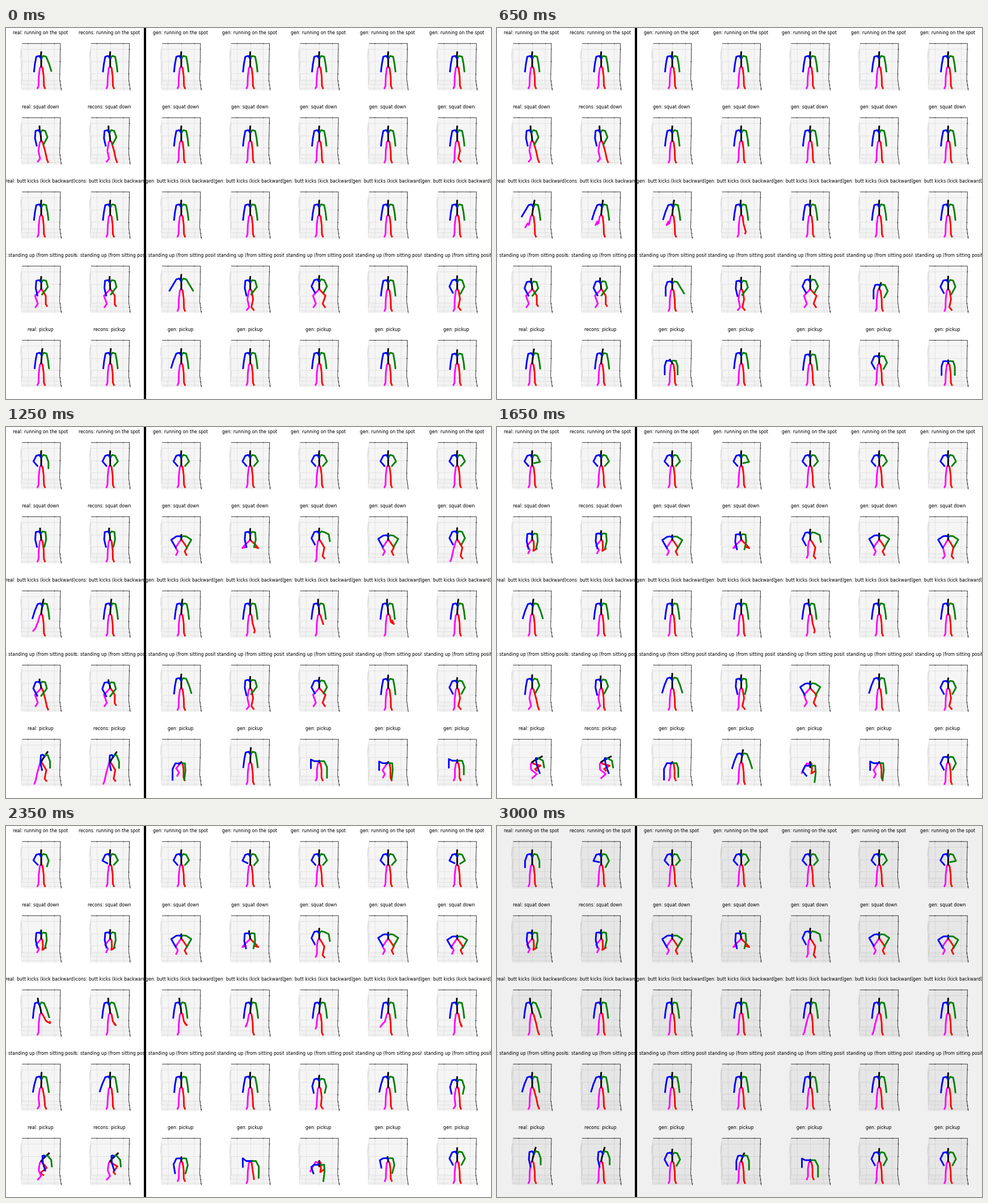
Write a matplotlib script that moves like this. It is 855 by 655 pixels and loops after 3.25 s.

```python
import numpy as np
import matplotlib.pyplot as plt
from matplotlib.animation import FuncAnimation
from matplotlib.collections import LineCollection, PolyCollection
from matplotlib.patches import Rectangle

W, H, DPI = 855, 655, 100
PX = 72 / DPI
CELL_W, CELL_H = 121.6, 131
BAR_X, BAR_W = 243.3, 3.7
FRAMES, LAST = 65, 60
KEYS = np.array([0, 13, 25, 33, 42, 53, LAST])

# Elbow and wrist from the shoulder, x pointing outward
ARMS = dict(
    hang=[(2.5, 13), (4, 26)], swing=[(5, 12), (9, 25)], out=[(6, 10), (12, 20)],
    bent=[(5, 10), (-2, 18)], fold=[(5, 11), (-5, 13)], loose=[(5, 11), (-1, 22)],
    soft=[(4, 11), (4, 22)], front=[(1, 13), (-2, 26)], inward=[(4, 11), (-3, 24)],
    cover=[(3, 11), (-7, 24)], across=[(-2, 12), (-7, 26)], akimbo=[(9, 6), (1, 20)],
    up=[(8, 4), (10, 16)], drop=[(3, 9), (3, 24)], drag=[(5, 10), (5, 29)],
    dip=[(1, 12), (-1, 29)], level=[(6, -3), (6, 12)],
)
# Knee, ankle and toe from the root, x pointing outward
LEGS = dict(
    stand=[(4.3, 18), (4.8, 34.5), (6.5, 38.5)], bend=[(5, 18), (2, 32), (6, 37)],
    wide=[(7, 19), (10, 33), (12, 38)], half=[(9, 14), (6, 29), (9, 33)],
    short=[(4, 13), (4, 27), (6, 32)], squat=[(10, 14), (6, 21), (9, 27)],
    deep=[(9, 11), (4, 18), (7, 24)], flat=[(9, 9), (14, 15), (8, 13)],
    tuck=[(3, 13), (2, 20), (8, 16)], sit=[(11, 12), (6, 26), (10, 32)],
    chair=[(8, 12), (8, 27), (10, 30)], kick=[(5, 15), (10, 18), (7, 12)],
    whip=[(6, 18), (8, 15), (12, 22)], step=[(4, 16), (8, 30), (7, 33)],
    back=[(6, 15), (10, 25), (14, 30)], lift=[(4, 9), (6, 15), (7, 18)],
    reach=[(12, 15), (20, 23), (24, 27)], kneel=[(2, 13), (-8, 21), (0, 28)],
    lunge=[(15, 6), (5, 12), (8, 15)], cross=[(10, 10), (-7, 15), (0, 18)],
    splay=[(6, 2), (11, 11), (15, 19)],
)


def pad(seq):
    """Hold the last entry until every key pose has one."""
    seq = seq.split() if isinstance(seq, str) else list(seq)
    return seq + seq[-1:] * (len(KEYS) - len(seq))


def arm(name, side, lean, tall):
    chest = np.array([lean * .5, -13.5 * tall])
    # A strong lean turns the body sideways
    reach = 8.7 * (1 - (lean / 20) ** 2)
    shoulder = chest + [side * reach, -3.6 * tall]
    joints = [shoulder + np.array(p) * [side, 1] for p in ARMS[name]]
    return [chest, chest + [side * reach * .4, -5 * tall], shoulder, *joints]


def leg(name, side):
    return [(0, 0), (side * 2.5, 3)] + [(side * x, y) for x, y in LEGS[name]]


def spine(lean, tall):
    return [(lean * a - b, -25 * tall * c) for a, b, c in
            [(0, 0, 0), (.2, 0, .28), (.5, 0, .54), (.75, .5, .74), (1, 0, 1)]]


def figure(blue="hang", green="hang", pink="stand", red="stand", tall=(1,), lean=(0,)):
    """Key poses of one figure: (keys, limbs, joints, 2)."""
    tracks = zip(*map(pad, (blue, green, pink, red, tall, lean)))
    return [[leg(r, 1), leg(p, -1), spine(l, t), arm(g, 1, l, t), arm(b, -1, l, t)]
            for b, g, p, r, t, l in tracks]


def running():
    run = "hang hang bent"
    return [
        figure("hang hang bent bent bent bent soft", "swing hang soft fold soft bent soft"),
        figure("hang hang bent bent fold bent fold", "hang hang bent bent bent bent loose"),
        figure(run, run),
        figure("hang hang bent bent fold bent", "hang hang bent fold bent"),
        figure(run, run),
        figure(run, run),
        figure("hang hang bent bent fold bent", "hang hang bent bent bent fold"),
    ]


def squat():
    down = "stand stand squat"
    wide = "hang hang akimbo"
    return [
        figure("front", "inward inward front", "bend bend stand deep", "wide wide stand tuck",
               [1, 1, .78, .58], [-3, -3, -2, 0]),
        figure("front", "inward inward front", "bend bend stand deep", "wide wide stand tuck",
               [1, 1, .78, .6], [-3, -3, -2, 0]),
        figure(wide, wide, down, down, [1, 1, .33, .3]),
        figure("hang hang front", "hang hang front", "stand stand flat", "stand stand flat",
               [1, 1, .75, .52], [0, 0, 0, -2]),
        figure("hang hang loose", "hang hang up", "stand stand stand short",
               "stand stand half", [1, 1, .78, .7]),
        figure(wide, wide, down, down, [1, 1, .42, .42]),
        figure("hang hang loose akimbo", "hang hang loose akimbo",
               "stand stand wide half squat", "bend stand half half squat",
               [1, 1, .8, .35, .22]),
    ]


def butt_kicks():
    return [
        figure("hang out swing swing hang", "hang hang hang swing swing",
               "stand whip back stand", "stand stand stand stand kick reach wide",
               lean=[0, 4, 4, 2, -4, -7, -4]),
        figure("hang swing hang", "hang hang hang hang swing hang", "stand kick stand",
               "stand stand stand stand kick step stand", lean=[0, 3, 2, 0, -4, -2, -1]),
        figure("hang swing hang", "hang", "stand kick stand",
               "stand stand stand stand kick step stand", lean=[0, 3, 2, 0, -3, -3, -1]),
        figure("hang", "hang", "stand stand stand stand kick stand",
               "stand step step stand", lean=[0, -1, 0, 0, 2, 2, 0]),
        figure("hang", "hang", "stand stand stand stand stand lift wide",
               "stand stand lift step stand", lean=[0, 0, -2, -3, 1, 3, 2]),
        figure("hang", "hang", "stand stand stand stand back whip wide",
               "stand stand kick stand", lean=[0, 0, -2, -1, 1, 0, 0]),
        figure("hang", "hang", "stand", "stand stand stand stand kick stand",
               lean=[0, 0, 2, 0, -1, 0, 0]),
    ]


def standing_up():
    return [
        figure("front inward inward hang hang swing", "cover cover cover inward hang",
               "sit sit sit bend bend stand", "chair chair wide wide stand wide",
               [.85, .72, .6, .9, 1], [0, -2, -3, 0, 1, 0]),
        figure("front inward inward front swing", "cover cover cover inward hang",
               "sit sit sit bend stand", "chair chair chair stand",
               [.85, .75, .55, .82, 1], [-1, -2, -3, -1, 0]),
        figure("out drop hang swing hang", "out out swing swing hang",
               tall=[1, .72, .95, 1]),
        figure("front front front front hang", "cover cover cover front hang",
               "bend bend bend stand", "bend bend bend bend stand", [.85, .8, .78, .9, 1]),
        figure("loose loose loose akimbo loose hang", "loose loose loose akimbo loose hang",
               "sit sit sit sit stand", "sit sit sit sit bend stand",
               [.92, .92, .72, .45, .62, 1]),
        figure("hang drop hang swing swing hang", "hang loose hang",
               tall=[.85, .42, .88, .97, 1], lean=[0, 3, 0]),
        figure("loose loose loose loose loose hang", "inward inward loose loose loose hang",
               "stand stand stand stand bend stand", "bend bend bend bend stand",
               [.9, .87, .7, .68, .5, .97]),
    ]


def pickup():
    return [
        figure("hang hang front across across front", "hang hang soft up up soft",
               "stand stand wide kneel kneel wide stand",
               "stand stand half lunge cross half stand",
               [1, .97, .72, .4, .42, .75, .95], [2, 3, 11, 17, 16, 10, 6]),
        figure("hang hang front across across front", "hang hang soft up up soft",
               "stand stand wide kneel kneel wide stand",
               "stand stand half lunge lunge half stand",
               [1, .97, .7, .4, .42, .75, .95], [1, 3, 11, 17, 16, 10, 6]),
        figure("swing drop drag drag drag loose", "hang drop dip drop dip loose",
               "stand stand deep short short stand", "stand stand short short short stand",
               [1, .25, -.12, -.1, .12, .5, .82], [0, -4, -4, -2, 0, 0, 0]),
        figure("hang hang hang swing level level drop", "hang hang hang swing drag drag drop",
               "stand", "stand stand stand stand short step stand",
               [1, 1, 1, .85, .1, .1, .55], [0, 0, 1, 3, 4, 2, 5]),
        figure("hang hang level bent bent level", "hang hang drag dip dip dip drag",
               "stand stand short splay splay splay short",
               "stand stand short tuck tuck tuck short", [1, .85, .1, -.35, -.35, -.3, .1]),
        figure("hang loose level level level loose", "hang loose dip dip dip loose",
               "stand stand squat squat short stand", "stand stand short short short stand",
               [1, .7, -.1, -.1, -.1, .8, .87], [0, 0, -3, -3, -2, 0]),
        figure("hang drop level loose", "hang drop drop loose",
               "stand stand short stand", "stand stand short stand",
               [.92, .2, .15, .52, .85, .95, .87]),
    ]


ROWS = {
    "running on the spot": running(),
    "squat down": squat(),
    "butt kicks (kick backward)": butt_kicks(),
    "standing up (from sitting position)": standing_up(),
    "pickup": pickup(),
}
PREFIX = ["real", "recons"] + ["gen"] * 5
COLORS = ["red", "magenta", "black", "green", "blue"]

LEFT = [c * CELL_W + (BAR_W if c > 1 else 0) for c in range(7)]
ROOTS = np.array([(x + 62.1, r * CELL_H + 67.8) for r in range(5) for x in LEFT])

# (keys, figures, limbs, joints, 2)
POSES = np.array([f for row in ROWS.values() for f in row]).swapaxes(0, 1)
POSES = POSES + ROOTS[:, None, None, :]
SLOPES = np.gradient(POSES, KEYS, axis=0) * .7


def pose_at(t):
    """Cubic Hermite blend of the key poses."""
    i = min(np.searchsorted(KEYS, t, side="right") - 1, len(KEYS) - 2)
    span = KEYS[i + 1] - KEYS[i]
    u = (t - KEYS[i]) / span
    ease = u * u * (3 - 2 * u)
    return ((1 - ease) * POSES[i] + ease * POSES[i + 1]
            + span * u * (1 - u) * ((1 - u) * SLOPES[i] - u * SLOPES[i + 1]))


# 3D box seen at 110 degrees elevation
TILT = np.radians(110)
BX, BZ, TX, TZ = .595, .4465, .408, .306


def project(x, y, z):
    s, c = np.sin(TILT), -np.cos(TILT)
    scale = 58.2 / (1 - (c * y + s * z) / 10)
    return x * scale, -(s * y - c * z) * scale


def path(*pts):
    return np.array([project(*p) for p in pts])


def everywhere(shapes):
    return [s + root for root in ROOTS for s in shapes]


def box_parts():
    panes = [
        path((-BX, BX, -BZ), (-BX, -BX, -BZ), (-BX, -BX, BZ), (-BX, BX, BZ)),
        path((-BX, -BX, -BZ), (BX, -BX, -BZ), (BX, -BX, BZ), (-BX, -BX, BZ)),
        path((-BX, -BX, -BZ), (BX, -BX, -BZ), (BX, BX, -BZ), (-BX, BX, -BZ)),
    ]
    grid, ticks = [], []
    for k in (-1, 0, 1):
        t, z = k * TX, k * TZ
        grid += [path((t, BX, -BZ), (t, -BX, -BZ), (t, -BX, BZ)),
                 path((-BX, t, BZ), (-BX, t, -BZ), (BX, t, -BZ)),
                 path((-BX, BX, z), (-BX, -BX, z), (BX, -BX, z))]
        ticks += [path((t, BX - .02, -BZ), (t, BX + .01, -BZ)),
                  path((BX - .02, t, -BZ), (BX + .01, t, -BZ)),
                  path((BX - .02, -BX, z), (BX + .01, -BX, z))]
    edges = [path((-BX, BX, -BZ), (BX, BX, -BZ), (BX, -BX, -BZ), (BX, -BX, BZ))]
    return panes, grid, edges + ticks


fig = plt.figure(figsize=(W / DPI, H / DPI), dpi=DPI, facecolor="white")
ax = fig.add_axes([0, 0, 1, 1])
ax.set(xlim=(0, W), ylim=(H, 0))
ax.axis("off")

panes, grid, edges = box_parts()
for pane, tone in zip(panes, (.95, .9, .925)):
    ax.add_collection(PolyCollection(everywhere([pane]), facecolors=[(tone,) * 3 + (.5,)],
                                     edgecolors="none", zorder=1))
ax.add_collection(LineCollection(everywhere(grid), colors=[(.5, .5, .5, .25)],
                                 linewidths=.55 * PX, zorder=2))
ax.add_collection(LineCollection(everywhere(edges), colors="black",
                                 linewidths=.75 * PX, zorder=2))
shade = ax.add_patch(Rectangle((0, 0), W, H, fc="black", alpha=.06, lw=0, zorder=3))

for r, action in enumerate(ROWS):
    for x, prefix in zip(LEFT, PREFIX):
        title = ax.text(x + CELL_W / 2, r * CELL_H + 11, f"{prefix}: {action}",
                        ha="center", va="baseline", family="DejaVu Sans",
                        fontsize=7.8 * PX, clip_on=True, zorder=4)
        title.set_clip_path(Rectangle((x, r * CELL_H), CELL_W, CELL_H,
                                      transform=ax.transData))

limbs = [ax.add_collection(LineCollection([], colors=c, linewidths=2.9 * PX,
                                          capstyle="projecting", joinstyle="round",
                                          zorder=5 + i))
         for i, c in enumerate(COLORS)]
ax.add_patch(Rectangle((BAR_X, 0), BAR_W, H, fc="black", lw=0, zorder=12))


def update(n):
    pose = pose_at(min(n, LAST))
    for i, limb in enumerate(limbs):
        limb.set_segments(pose[:, i])
    shade.set_visible(n >= LAST)
    return limbs + [shade]


anim = FuncAnimation(fig, update, frames=FRAMES, interval=1000 / 20, repeat=True,
                     repeat_delay=0, blit=False)
plt.show()
```
